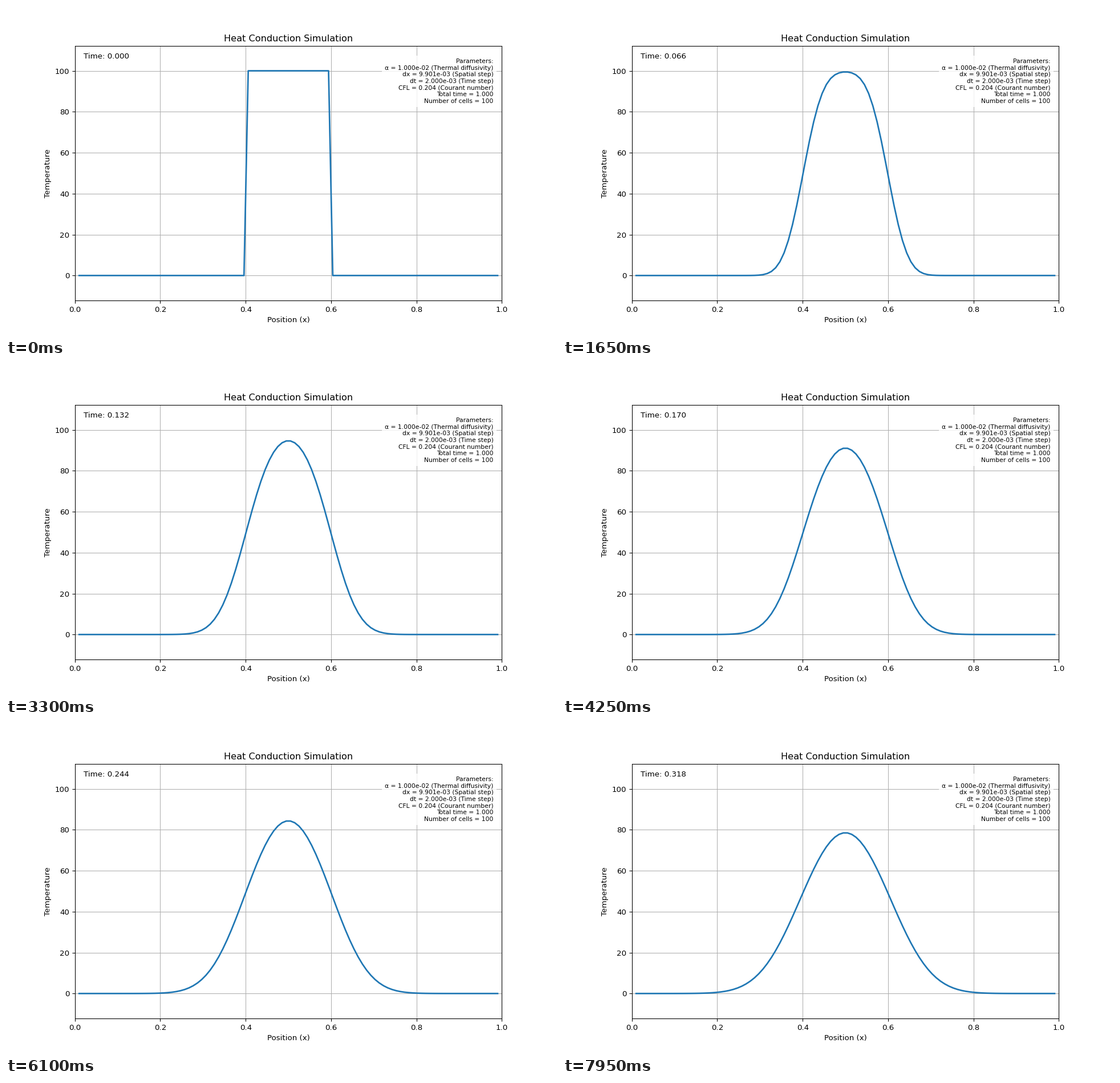
These frames come from a looping animation (966 px wide and 580 px high, 8000 ms). A matplotlib script:

```python
import numpy as np
import matplotlib.pyplot as plt
from matplotlib.animation import FuncAnimation

ALPHA, DT, TOTAL, CELLS = 1e-2, 2e-3, 1.0, 100
FRAMES, INTERVAL = 160, 50

dx = 1 / (CELLS + 1)
cfl = ALPHA * DT / dx**2
x = np.arange(1, CELLS + 1) * dx


def slope(q):
    """Fourth-order staggered difference, in units of one cell."""
    return (q[:-3] - 27 * q[1:-2] + 27 * q[2:-1] - q[3:]) / 24


def step(u):
    """Advance one explicit step: flux at the faces, then its divergence."""
    return u + cfl * slope(slope(np.pad(u, 3)))


temps = [np.where((x > 0.4) & (x < 0.6), 100.0, 0.0)]
while len(temps) < FRAMES:
    temps.append(step(temps[-1]))
temps = np.array(temps)

low, high = temps.min(), temps.max()
pad = 0.1 * (high - low)

plt.rcParams["font.family"] = "DejaVu Sans"
fig, ax = plt.subplots(figsize=(10, 6.00415), dpi=96.6)  # 966 x 580 px
ax.set_xlim(0, 1)
ax.set_ylim(low - pad, high + pad)
ax.set_title("Heat Conduction Simulation")
ax.set_xlabel("Position (x)")
ax.set_ylabel("Temperature")
ax.grid(True)

line, = ax.plot(x, temps[0], lw=2)
clock = ax.text(0.02, 0.95, "", transform=ax.transAxes)

params = "\n".join([
    "Parameters:",
    f"α = {ALPHA:.3e} (Thermal diffusivity)",
    f"dx = {dx:.3e} (Spatial step)",
    f"dt = {DT:.3e} (Time step)",
    f"CFL = {cfl:.3f} (Courant number)",
    f"Total time = {TOTAL:.3f}",
    f"Number of cells = {CELLS}",
])
ax.text(0.98, 0.95, params, transform=ax.transAxes, fontsize=8,
        ha="right", va="top",
        bbox=dict(facecolor="white", alpha=0.8, edgecolor="none"))


def draw(i):
    line.set_ydata(temps[i])
    clock.set_text(f"Time: {i * DT:.3f}")
    return line, clock


anim = FuncAnimation(fig, draw, frames=FRAMES, interval=INTERVAL,
                     init_func=lambda: draw(0), repeat=True, repeat_delay=0)
plt.show()
```
